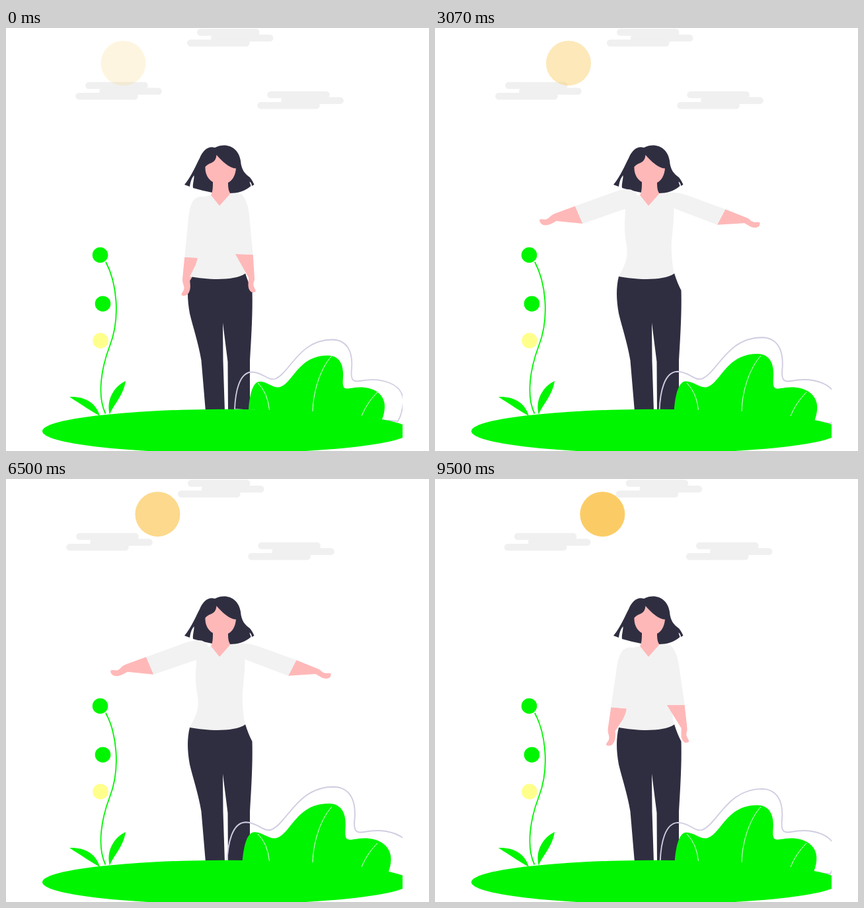
Write an HTML page that moves like this. It is 640 by 640 pixels and loops after 9.57 s.

```html
<!DOCTYPE html>
<html lang="en">
<head>
<meta charset="utf-8">
<title>Morning stretch</title>
<style>
  html, body { margin: 0; width: 100%; height: 100%; overflow: hidden; background: #fff; }
  svg { display: block; width: 100%; height: 100%; }
  .green { fill: #00f500; }
  .dark { fill: #2f2e41; }
  .skin { fill: #ffb8b8; }
  .shirt { fill: #f2f2f2; }
  .line { fill: none; }
</style>
</head>
<body>
<svg viewBox="0 0 640 640">
  <defs>
    <clipPath id="view"><rect width="600" height="640"/></clipPath>
    <g id="cloud" fill="#f0f0f0">
      <rect x="15" width="94.5" height="10.5" rx="5.2"/>
      <rect x="36" y="8.7" width="94.5" height="10.5" rx="5.2"/>
      <rect y="16.2" width="94.5" height="10.5" rx="5.2"/>
    </g>
  </defs>
  <g clip-path="url(#view)">
    <g id="clouds">
      <use href="#cloud" x="274" y="1.3"/>
      <use href="#cloud" x="105.2" y="81.7"/>
      <use href="#cloud" x="380.3" y="95.7"/>
    </g>
    <circle id="sun" cy="53.2" r="34" fill="#fbcc66"/>

    <!-- woman -->
    <path class="dark" d="M278 376C274 392 274 410 278 432C283 453 291 476 295.500 503L302 580H331L328.500 503L328 446L335.500 505L336 580H369V503C371 470 373.500 430 372.500 397C369 390 365 381 362 371Z"/>
    <path class="dark" d="M270 237C281 224 288 206 293 197C298 185 306 178 316 181C334 172 352 181 355 201C356 215 362 221 369 226C372 230 374 233 375.500 237L372 239C372 236 370 233 368.500 232.500C369 235 370 237 370.500 239C362 247 350 250 339 250L312 249C303 247 293 245 283 242C282 236 285 228 284.500 223C280 228 279 234 278 240Z"/>
    <path class="skin" d="M301.500 210C309 202 317 206 318.500 192C327 202 338 212 348 212.500C347 224 342 231 336 234C336 243 337 247 340 251L323 270L310 253C313 248 313 240 313 233C306 229 301 221 301.500 210Z"/>
    <g id="leftArm">
      <path class="skin" d="M215 286L231 310L191 313.500C186 318 181 323 173 323C168 322 166 319 166 316C170 313 174 317 179 311C182 307 184 304 188 302Z"/>
      <path class="shirt" d="M215 286L270 253.500C280 248 287 246 293 246C300 247 304 251 306 256L300 272L288 277.500L231 310Z"/>
    </g>
    <path class="shirt" d="M310 253L323 269L340 250C352 250 360 254 362 262L361 290C359 315 357 325 358 340C359 355 360 365 362 371.500C345 383 305 381 278 376C288 358 291 350 290.500 335C289 318 285 310 288 280V262C295 256 303 254 310 253Z"/>
    <g id="rightArm">
      <path class="skin" d="M434.500 290L418 311L459 316C464 320 469 326 476 326C480 326 482 323 482 319.500C477 317 473 319 469 314C467 310 464 309 462 307.500Z"/>
      <path class="shirt" d="M434.500 290L384 260C372 253 362 249 350 250L344 262L361 276L418 311Z"/>
    </g>

    <!-- bush -->
    <path id="bush" class="green" d="M367 577C369 552 374 535 384 535C396 535 404 546 415 543C435 536 442 495.500 487 495.500C503 495.500 511 507 510 528C509 543 510 546 518 545.500C530 544 535 543 543 544C562 546 573 558 573 572C573 580 571 587 569 592Z"/>
    <path id="outline" class="line" stroke="#d0cde1" stroke-width="1.800" d="M346 577C347 550 353 521 372 520.500C389 521 396 534 407 531C430 522 443 471.500 494 471.500C515 472 525 488 523 515C521 533 525 536 536 534C566 528 601 537 601 565C600 580 597 588 593 595Z"/>
    <path class="line" stroke="#f2f2f2" d="M381 537Q396 552 398.500 578M493 496C478 512 465 545 464 580M562 551Q546 567 538 587"/>

    <ellipse class="green" cx="334" cy="610" rx="279" ry="33.200"/>

    <!-- flower -->
    <path class="line" stroke="#00f500" stroke-width="1.800" d="M151 354C167 384 174 437 157 481C145 512 137 555 150.500 583.500"/>
    <path class="green" d="M96 558C116 557 136 565 142 587C130 580 114 570 96 558ZM181 534C164 542 151 562 157 585C161 572 178 556 181 534Z"/>
    <circle class="green" cx="142.500" cy="343.500" r="11.800"/>
    <circle class="green" cx="146.500" cy="417.200" r="11.800"/>
    <circle cx="143" cy="473" r="11.800" fill="#ffff8c"/>
  </g>
</svg>
<script>
  const LOOP = 9570, FPS = 14;
  const el = id => document.getElementById(id);
  const move = (id, transform) => el(id).setAttribute('transform', transform);

  // Linear there and back: 0 -> 1 -> 0, each way lasting `half` ms.
  const pingPong = (t, half) => 1 - Math.abs((t / half) % 2 - 1);

  const scaleAbout = (id, s, x, y) =>
    move(id, `translate(${x} ${y}) scale(${s}) translate(${-x} ${-y})`);

  function draw(t) {
    el('sun').setAttribute('cx', 177.5 + 76.4 * t / LOOP);
    el('sun').setAttribute('opacity', 0.2 + 0.8 * t / LOOP);
    move('clouds', `translate(${-21.8 * pingPong(t, LOOP / 2)})`);

    // The arms are drawn raised by 53.8 degrees.
    const lift = 90 * pingPong(t, LOOP / 4) - 53.8;
    move('leftArm', `rotate(${lift} 302.5 262)`);
    move('rightArm', `rotate(${-lift} 352 256.5)`);

    const size = 1 + 0.1 * pingPong(t, 6000);
    scaleAbout('bush', size, 470, 544);
    scaleAbout('outline', size, 473, 534);
  }

  function tick() {
    const step = Math.floor((performance.now() % LOOP + 5) * FPS / 1000);
    draw(Math.min(step * 1000 / FPS, LOOP - 70));
    requestAnimationFrame(tick);
  }
  tick();
</script>
</body>
</html>
```
